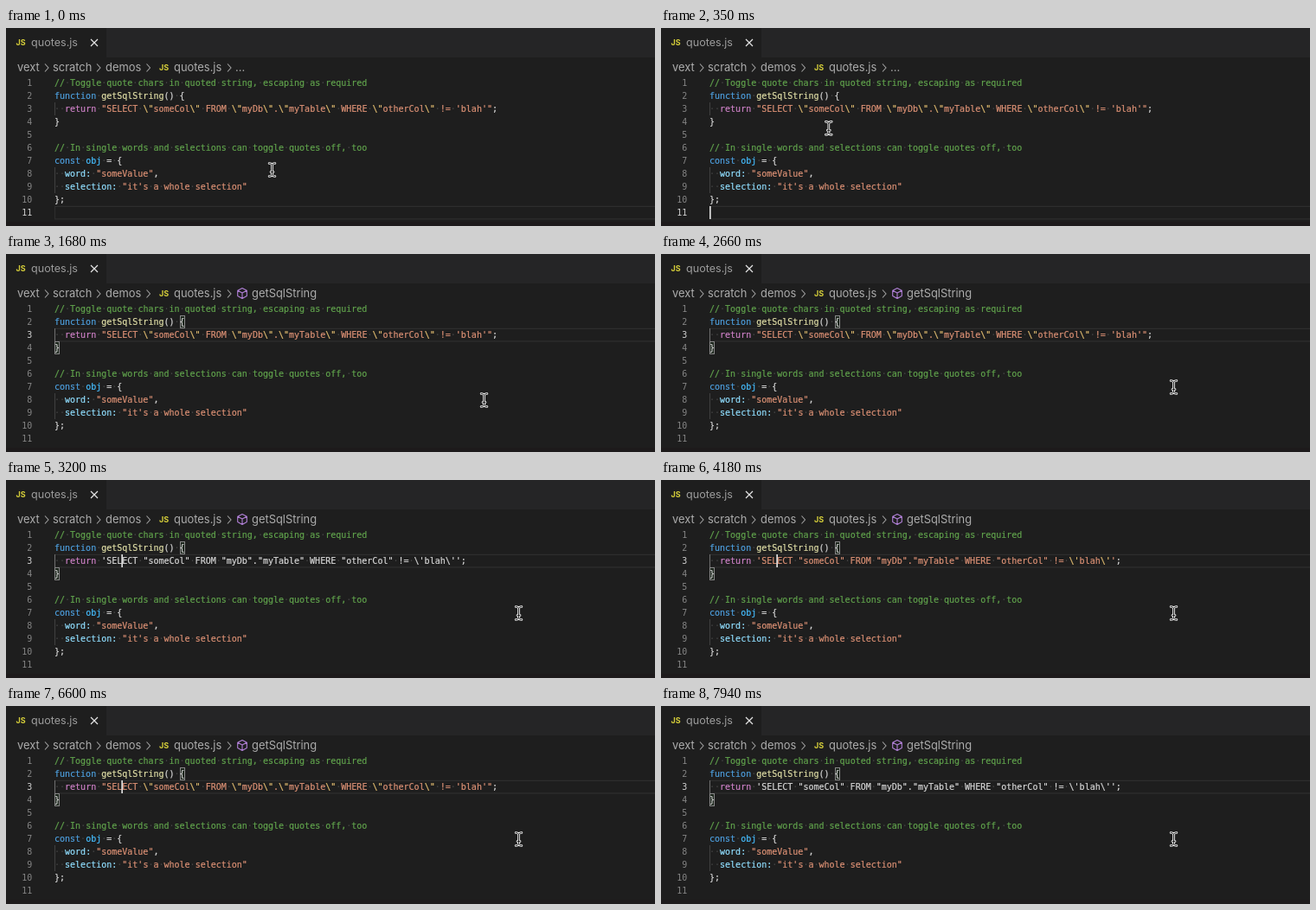
Write an HTML page that moves like this. It is 750 px wide and 229 px high and loops after 8 s.

```html
<!DOCTYPE html>
<html lang="en">
<head>
<meta charset="utf-8">
<title>Toggle quotes</title>
<style>
  html, body { margin: 0; width: 100%; height: 100%; overflow: hidden; background: #1e1e1e; }
  svg { display: block; width: 750px; height: 229px; }
  .code text { font: 10px "DejaVu Sans Mono", monospace; color: #d6d6d6; }
  .code text, tspan { fill: currentColor; stroke: currentColor; stroke-width: .2px; }
  .ui text { font: 12.9px Inter, sans-serif; fill: #acacac; }
  .ui .tab { font-size: 12.6px; fill: #9c9c9c; }
  .ui .js { font-size: 9px; font-weight: 700; fill: #d6cf3a; }
  .code .num { color: #858585; stroke: none; text-anchor: end; }
  .code .num.on { color: #d0d0d0; }
  .com { color: #60a24c; }
  .key { color: #4d9fde; }
  .fn { color: #e0dea6; }
  .ret { color: #cd80c6; }
  .str { color: #db9074; }
  .esc { color: #e2bd70; }
  .prop { color: #90deff; }
  .var { color: #45bdff; }
  .dot { color: #454545; stroke: none; }
</style>
</head>
<body>
<svg viewBox="0 0 750 229">
  <defs>
    <path id="beam" d="M-3.4-7.500Q-.5-7.500 0-5.500Q.5-7.500 3.400-7.500M0-5.500V5.500M-3.400 7.500Q-.5 7.500 0 5.500Q.5 7.500 3.400 7.500M-1.500 2.500H1.500"/>
  </defs>
  <rect width="750" height="229" fill="#1e1e1e"/>
  <rect x="116" width="634" height="34" fill="#252526"/>
  <rect y="224" width="750" height="5" fill="#1d1a1b"/>
  <g class="ui">
    <text class="js" x="11.5" y="20.3">JS</text>
    <text class="tab" x="29" y="21">quotes.js</text>
    <path d="M98 13l8 8M106 13l-8 8" stroke="#e4e4e4" stroke-width="1.2"/>
    <text x="13" y="50">vext</text>
    <text x="54" y="50">scratch</text>
    <text x="115" y="50">demos</text>
    <text class="js" x="177" y="48.8">JS</text>
    <text x="194" y="50">quotes.js</text>
    <path d="M45 41.5l4 4.5l-4 4.5M105 41.5l4 4.5l-4 4.5M162.500 41.5l4 4.5l-4 4.5M256 41.5l4 4.5l-4 4.5" fill="none" stroke="#a0a0a0" stroke-width="1.1"/>
    <text id="more" x="265" y="50">...</text>
    <g id="symbol">
      <path d="M273 39.5l5.3 2.7v6.3l-5.3 3l-5.3-3v-6.3zM267.7 42.2l5.3 2.8l5.3-2.8M273 45v6.5" fill="none" stroke="#b180d7" stroke-width="1.1" stroke-linejoin="round"/>
      <text x="284" y="50">getSqlString</text>
    </g>
  </g>
  <g class="code">
    <rect id="current" x="56.5" width="695" height="14.5" fill="none" stroke="#2e2e2e" stroke-width="1.2"/>
    <path id="guide" d="M56.5 86v15"/>
    <path d="M56.5 161v30" stroke="#404040"/>
    <g id="pair" fill="#1b251b" stroke="#888">
      <rect x="201.5" y="71.5" width="5" height="14"/>
      <rect x="56.5" y="101.5" width="5" height="14"/>
    </g>
    <g id="rows"></g>
    <rect id="caret" width="1.7" height="15" fill="#dcdcdc"/>
  </g>
  <g id="mouse" fill="none" stroke-linecap="round">
    <use href="#beam" stroke="#f4f4f4" stroke-width="2.7"/>
    <use href="#beam" stroke="#151515" stroke-width=".9"/>
  </g>
</svg>
<script>
const LOOP = 8000, CLICK = 1240, LINE = 15, TOP = 56;
const NS = "http://www.w3.org/2000/svg";
const $ = id => document.getElementById(id);

const sql = {
  double: String.raw`"SELECT \"someCol\" FROM \"myDb\".\"myTable\" WHERE \"otherCol\" != 'blah'"`,
  single: String.raw`'SELECT "someCol" FROM "myDb"."myTable" WHERE "otherCol" != \'blah\''`,
  tick: "`SELECT \"someCol\" FROM \"myDb\".\"myTable\" WHERE \"otherCol\" != 'blah'`"
};
const query = (kind, cls) => [["", "  "], ["ret", "return"], ["", " "], [cls, sql[kind]], ["", ";"]];

const lines = [
  [["com", "// Toggle quote chars in quoted string, escaping as required"]],
  [["key", "function"], ["", " "], ["fn", "getSqlString"], ["", "() {"]],
  query("double", "str"),
  [["", "}"]],
  [],
  [["com", "// In single words and selections can toggle quotes off, too"]],
  [["key", "const"], ["", " "], ["var", "obj"], ["", " = {"]],
  [["", "  "], ["prop", "word:"], ["", " "], ["str", '"someValue"'], ["", ","]],
  [["", "  "], ["prop", "selection:"], ["", " "], ["str", '"it\'s a whole selection"']],
  [["", "};"]],
  []
];

function addText(cls, x, y) {
  const el = document.createElementNS(NS, "text");
  el.setAttribute("class", cls);
  el.setAttribute("x", x);
  el.setAttribute("y", y);
  $("rows").append(el);
  return el;
}

// Spaces become visible dots; escapes in strings get their own colour.
function paint(el, tokens) {
  el.replaceChildren();
  for (const [cls, text] of tokens) {
    for (const part of text.match(/ +|\\.|[^ \\]+/g)) {
      const span = document.createElementNS(NS, "tspan");
      const escaped = cls === "str" && part[0] === "\\";
      span.setAttribute("class", part[0] === " " ? "dot" : escaped ? "esc" : cls);
      span.textContent = part.replace(/ /g, "·");
      el.append(span);
    }
  }
}

const nums = [], rows = [];
lines.forEach((tokens, i) => {
  const y = TOP + 11 + i * LINE;
  nums[i] = addText("num", 30.3, y);
  nums[i].textContent = i + 1;
  rows[i] = addText("", 56, y);
  paint(rows[i], tokens);
});

// Pointer stops: [step, x, y], one step every 88.3 ms.
const stops = [[0, 307.5, 164], [6, 154, 99], [7, 154, 99], [10, 132, 97],
  [14, 132, 97], [19, 552.5, 169], [22, 592.5, 154]];

function pointer(t) {
  const step = Math.floor((t + 4) / 88.3);
  const i = stops.findIndex(s => s[0] > step);
  if (i < 0) return stops[stops.length - 1].slice(1);
  const [a, b] = [stops[i - 1], stops[i]];
  const u = (step - a[0]) / (b[0] - a[0]);
  const e = u * u * (3 - 2 * u);
  return [1, 2].map(k => a[k] + (b[k] - a[k]) * e);
}

const blinks = [350, 800, CLICK, 1680, 2210, 2660, 3200, 3650, 4180, 4630,
  5170, 5710, 6150, 6680, 7130, 7670];

// A new string may stay plain for a moment before it is coloured.
const edits = [[0, "double", "str"], [3200, "single", "plain"], [3290, "single", "str"],
  [4900, "tick", "str"], [6600, "double", "str"], [7940, "single", "plain"]];
let shown = edits[0];

const show = (id, on) => $(id).setAttribute("visibility", on ? "visible" : "hidden");

function draw(t) {
  const clicked = t >= CLICK;
  const row = clicked ? 2 : 10;
  const y = TOP + row * LINE;

  show("more", !clicked);
  show("symbol", clicked);
  show("pair", clicked);
  show("caret", blinks.filter(b => b <= t).length % 2);
  $("caret").setAttribute("x", clicked ? 133.3 : 56);
  $("caret").setAttribute("y", y);
  $("current").setAttribute("y", y + 0.4);
  $("guide").setAttribute("stroke", clicked ? "#707070" : "#404040");
  nums.forEach((n, i) => n.classList.toggle("on", i === row));

  const edit = edits.filter(e => e[0] <= t).pop();
  if (edit !== shown) {
    shown = edit;
    paint(rows[2], query(edit[1], edit[2]));
  }
  $("mouse").setAttribute("transform", `translate(${pointer(t)})`);
}

const start = performance.now();
function tick() {
  draw((performance.now() - start) % LOOP);
  requestAnimationFrame(tick);
}
tick();
</script>
</body>
</html>
```
